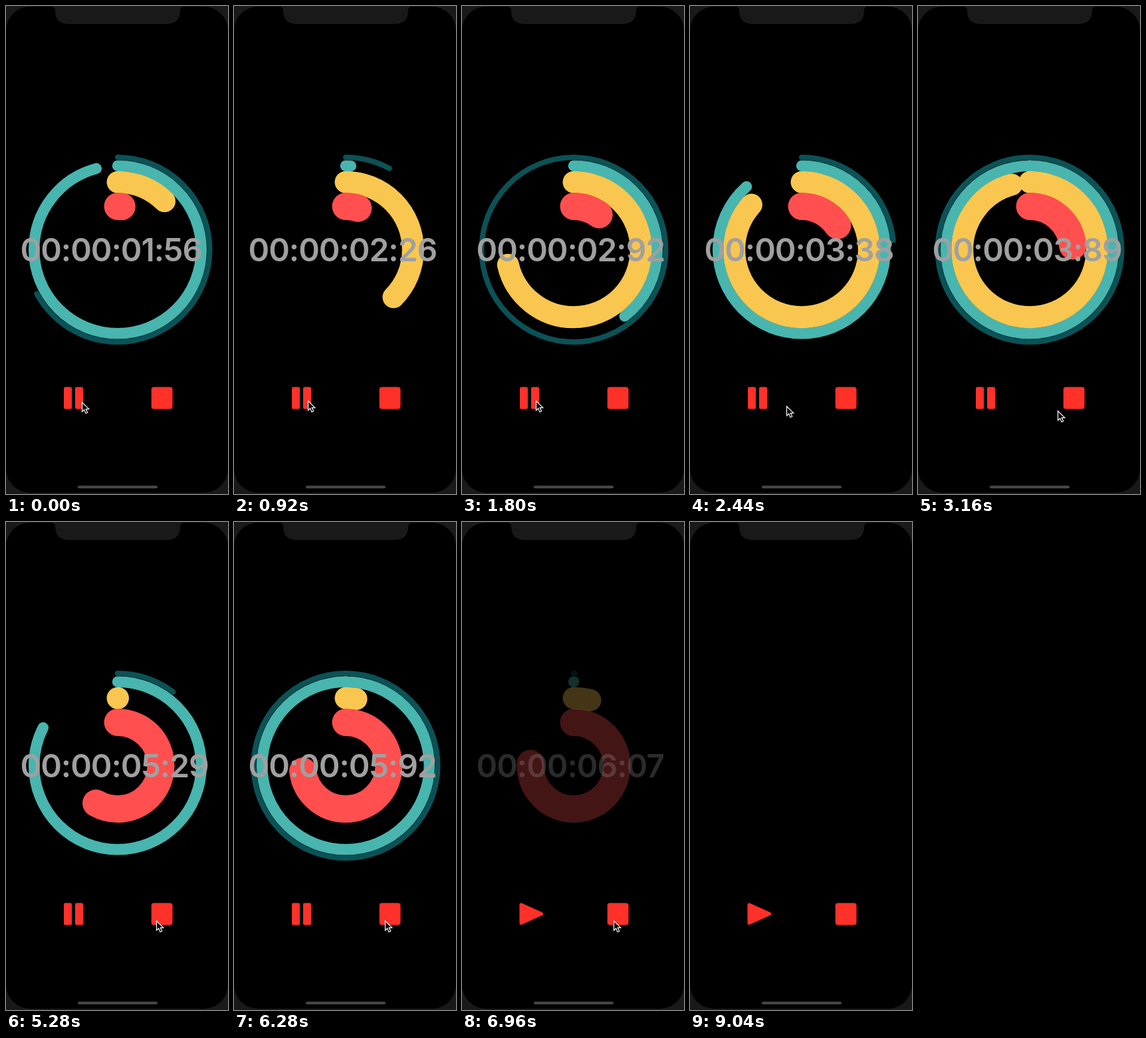
An HTML page with a canvas that plays this animation: 334x732 px, repeating every 9280 ms.

```html
<!DOCTYPE html>
<html lang="en">
<head>
<meta charset="utf-8">
<title>Stopwatch rings</title>
<style>
  html, body { margin: 0; width: 100%; height: 100%; overflow: hidden; background: #191919; }
  canvas { display: block; }
</style>
</head>
<body>
<canvas id="stage" width="334" height="732"></canvas>
<script>
const ctx = document.getElementById('stage').getContext('2d');
const LOOP = 9.28, STEP = 0.04;
const STOP = 6.52, FADE = 0.74, POINTER_GONE = 7.32;
const CENTER = { x: 168, y: 365.5 };
const RED = '#ff3129';

// Each ring fills once per period, in stopwatch seconds.
const RINGS = [
  { radius: 138.5, width: 8, color: '#0b5256', period: 1 },
  { radius: 125.8, width: 16.5, color: '#48b5af', period: 2 },
  { radius: 101.3, width: 33, color: '#f9c74f', period: 5 },
  { radius: 65, width: 41, color: '#ff4f4f', period: 10 },
];

// Keys: [time, value, ...]
const CLOCK = [
  [0, 1.565], [0.9, 2.255], [1.8, 2.925], [2.48, 3.417], [3.16, 3.895],
  [4, 4.475], [4.64, 4.892], [5.28, 5.295], [5.9, 5.691], [STOP, 6.075],
];
const POINTER = [
  [0, 114, 594], [0.6, 111, 592], [2.2, 111, 592], [2.55, 160, 604],
  [2.9, 204, 609], [3.16, 210, 607], [3.6, 226, 599], [4, 226, 599],
  [4.4, 226, 598], [6.2, 226, 598], [6.5, 228, 598],
];

const easeInOutCubic = u => u < 0.5 ? 4 * u ** 3 : 1 - 4 * (1 - u) ** 3;

function sample(keys, t) {
  const next = keys.findIndex(key => key[0] > t);
  if (next < 0) return keys[keys.length - 1].slice(1);
  const [a, b] = [keys[next - 1], keys[next]];
  const u = (t - a[0]) / (b[0] - a[0]);
  return a.slice(1).map((value, i) => value + (b[i + 1] - value) * u);
}

function box(x, y, w, h, radius, color) {
  ctx.fillStyle = color;
  ctx.beginPath();
  ctx.roundRect(x, y, w, h, radius);
  ctx.fill();
}

function drawPhone() {
  ctx.fillStyle = '#191919';
  ctx.fillRect(0, 0, 334, 732);
  box(0, 1, 334, 729, 36, '#000');
  ctx.fillStyle = '#191919';
  ctx.fill(new Path2D('M68 0V1Q74 1 74 7Q74 27 95 27H241Q262 27 262 7Q262 1 268 1V0Z'));
  box(108, 719.5, 120, 4, 2, '#484848');
}

function drawRing({ radius, width, color, period }, clock) {
  const start = -Math.PI / 2;
  const sweep = easeInOutCubic(clock / period % 1) * 2 * Math.PI;
  ctx.strokeStyle = color;
  ctx.lineWidth = width;
  ctx.lineCap = 'round';
  ctx.beginPath();
  ctx.arc(CENTER.x, CENTER.y, radius, start, start + Math.max(sweep, 0.001));
  ctx.stroke();
}

function drawClock(clock) {
  const parts = [0, 0, Math.floor(clock), Math.floor(clock * 100) % 100];
  ctx.font = '600 48px Inter, sans-serif';
  ctx.letterSpacing = '-1px';
  ctx.fillStyle = '#a0a0a0';
  ctx.fillText(parts.map(n => String(n).padStart(2, '0')).join(':'), 21.5, 383);
}

function drawButtons(running) {
  if (running) {
    box(87, 571.5, 12, 33, 2, RED);
    box(104, 571.5, 12, 33, 2, RED);
  } else {
    const triangle = new Path2D('M89 574V601.5L119.5 587.7Z');
    ctx.fillStyle = ctx.strokeStyle = RED;
    ctx.lineWidth = 5;
    ctx.lineJoin = 'round';
    ctx.fill(triangle);
    ctx.stroke(triangle);
  }
  box(218.7, 571.5, 31.8, 33, 4, RED);
}

function drawPointer([x, y]) {
  const arrow = new Path2D('M0.5 0.5V14.5L3.7 11.5L6 17L8.7 15.8L6.3 10.6H10.8Z');
  ctx.save();
  ctx.translate(Math.round(x), Math.round(y));
  ctx.fillStyle = '#000';
  ctx.strokeStyle = '#fff';
  ctx.lineWidth = 1.2;
  ctx.lineJoin = 'miter';
  ctx.fill(arrow);
  ctx.stroke(arrow);
  ctx.restore();
}

function draw(t) {
  drawPhone();
  const [clock] = sample(CLOCK, t);
  const fade = Math.min(1, Math.max(0, (t - STOP) / FADE));
  ctx.globalAlpha = 1 - easeInOutCubic(fade);
  RINGS.forEach(ring => drawRing(ring, clock));
  drawClock(clock);
  ctx.globalAlpha = 1;
  drawButtons(t < STOP);
  if (t < POINTER_GONE) drawPointer(sample(POINTER, t));
}

const origin = performance.now();
function tick() {
  const t = (performance.now() - origin) / 1000 % LOOP;
  draw(Math.floor(t / STEP + 1e-6) * STEP);
  requestAnimationFrame(tick);
}
tick();
</script>
</body>
</html>
```
